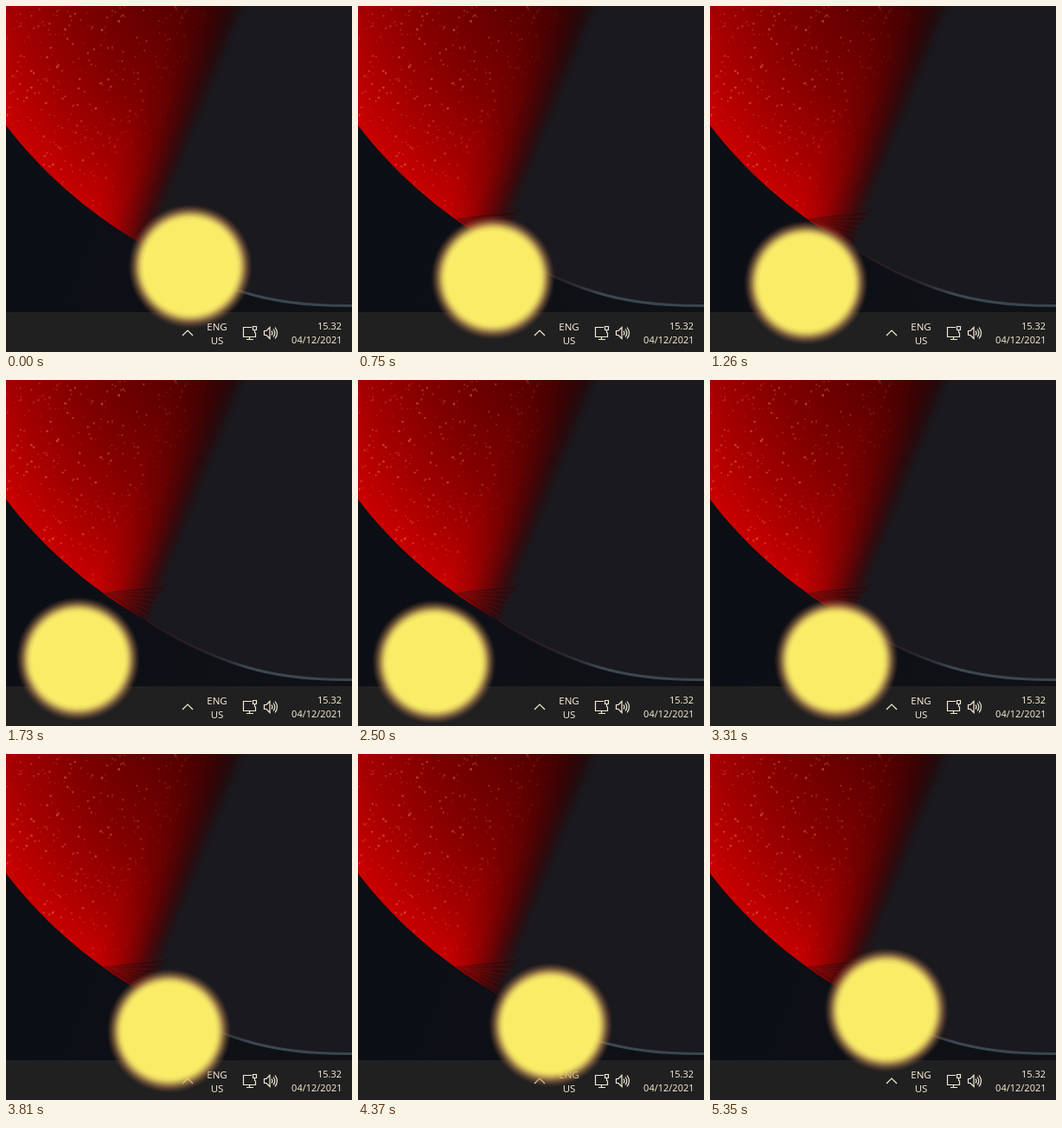
An HTML page with a canvas for the animation above (5.38 s loop, 400 by 400 pixels).

```html
<!DOCTYPE html>
<html lang="en">
<head>
<meta charset="utf-8">
<title>Glowing pointer</title>
<style>
html, body { margin: 0; width: 100%; height: 100%; overflow: hidden; background: #0b0d14; }
canvas { display: block; }
</style>
</head>
<body>
<canvas id="stage" width="400" height="400"></canvas>
<script>
const LOOP = 5380;
const ctx = document.getElementById('stage').getContext('2d');
const backdrop = document.createElement('canvas');
backdrop.width = backdrop.height = 400;

// Ball path: time, x, y
const keys = [
  [0, 213, 301], [550, 173, 311], [750, 156, 314], [1110, 123, 318],
  [1260, 111, 320], [1670, 86, 322], [1940, 78, 325], [2260, 78, 325],
  [2500, 88, 326], [2790, 104, 326], [3310, 146, 324], [3900, 197, 319],
  [4370, 223, 313], [4700, 229, 308], [5000, 222, 303], [5350, 204, 296]
];

const lowerRim = 'C195 300 235 319 275 331C310 342 350 347 400 346.5';

function addStops(gradient, stops) {
  for (const [at, color] of stops) gradient.addColorStop(at, color);
  return gradient;
}

function seeded(seed) {
  return () => (seed = seed * 16807 % 2147483647) / 2147483647;
}

function drawSphere(g) {
  g.save();
  g.clip(new Path2D('M0 138C38 188 92 237 152 272' + lowerRim + 'V0H0Z'));

  // Red glow, brightest at the rim
  g.fillStyle = addStops(g.createRadialGradient(390, -124, 200, 390, -124, 470), [
    [0, '#4e0000'], [0.15, '#5c0000'], [0.52, '#820000'], [0.77, '#a50000'], [1, '#cb0000']
  ]);
  g.fillRect(0, 0, 400, 400);

  const rand = seeded(77);
  g.fillStyle = '#e2714e';
  for (let i = 0; i < 620; i++) {
    const x = rand() * 250, y = rand() * 262;
    const edge = (250 - x - y * 0.4) / 110;
    g.globalAlpha = Math.max(0, Math.min(1, edge)) * (0.12 + rand() * 0.45);
    g.beginPath();
    g.arc(x, y, 0.6 + rand() * 0.9, 0, 7);
    g.fill();
  }
  g.globalAlpha = 1;

  // Dark face with a soft edge
  g.fillStyle = addStops(g.createLinearGradient(172, 69, 241, 97), [
    [0, 'rgba(20,6,10,0)'], [0.35, 'rgba(20,6,10,.16)'], [0.6, 'rgba(20,8,12,.44)'],
    [0.8, 'rgba(22,14,18,.76)'], [0.92, 'rgba(25,22,27,.95)'], [1, '#1a191e']
  ]);
  g.fillRect(0, 0, 400, 400);
  g.restore();

  g.lineWidth = 3;
  g.strokeStyle = addStops(g.createLinearGradient(165, 0, 400, 0),
    [[0, '#38383e00'], [0.3, '#38383e66'], [0.5, '#3b4851'], [1, '#39454e']]);
  g.stroke(new Path2D('M152 272' + lowerRim));
}

function drawTaskbar(g) {
  g.fillStyle = '#202021';
  g.fillRect(0, 354, 400, 46);

  g.fillStyle = '#fff3da';
  const label = (text, x, y, size, align) => {
    g.font = '500 ' + size + 'px "Open Sans", "Noto Sans", sans-serif';
    g.textAlign = align;
    g.fillText(text, x, y);
  };
  label('ENG', 244, 375, 11.5, 'center');
  label('US', 244, 391, 11.5, 'center');
  label('15.32', 388, 374, 11, 'right');
  label('04/12/2021', 388.5, 390, 11, 'right');

  g.strokeStyle = '#f5ecd6';
  g.lineWidth = 1.2;
  g.stroke(new Path2D('M204 381L210 375L216 381'));
  g.stroke(new Path2D('M284 371.5H274.5V382.5H288.5V377.5M278 385.5H286M281.5 382.5V385' +
    'M285.5 370.5H289.5V374.5H285.5ZM287.5 374.5V378'));
  g.stroke(new Path2D('M298.5 375.5H301L305 371.5V384.5L301 380.5H298.5Z' +
    'M307 375.5Q309 378 307 380.5M309 373.5Q312.5 378 309 382.5M311 371.5Q316 378 311 384.5'));
}

function drawBackdrop() {
  const g = backdrop.getContext('2d');
  g.fillStyle = addStops(g.createLinearGradient(0, 200, 330, 350),
    [[0, '#0b0e15'], [1, '#0f1116']]);
  g.fillRect(0, 0, 400, 400);
  drawSphere(g);
  drawTaskbar(g);
}

// Dim wedge left behind once the ball has passed the tip
function drawTrace() {
  ctx.fillStyle = 'rgba(42,9,12,.4)';
  ctx.fill(new Path2D('M113 246L188 235L170 256L163 279Z'));
  ctx.strokeStyle = 'rgba(150,30,28,.3)';
  ctx.lineWidth = 0.8;
  for (let i = 0; i < 7; i++) {
    ctx.beginPath();
    ctx.moveTo(116 + i * 2, 245 + i);
    ctx.lineTo(182 - i * 3, 237 + i * 6);
    ctx.stroke();
  }
}

function drawBall(x, y) {
  ctx.fillStyle = addStops(ctx.createRadialGradient(x, y, 0, x, y, 72), [
    [0, '#f9ec67'], [0.74, '#f9ec67'], [0.79, 'rgba(240,222,102,.96)'],
    [0.84, 'rgba(222,190,94,.82)'], [0.89, 'rgba(190,146,82,.6)'],
    [0.94, 'rgba(150,104,64,.36)'], [1, 'rgba(110,66,40,0)']
  ]);
  ctx.fillRect(x - 72, y - 72, 144, 144);
}

// Cubic through the keys, flat at turning points
function slope(i, axis) {
  const a = keys[i - 1], b = keys[i], c = keys[i + 1];
  if (!a || !c) {
    const [p, q] = a ? [a, b] : [b, c];
    return (q[axis] - p[axis]) / (q[0] - p[0]);
  }
  const turning = (b[axis] - a[axis]) * (c[axis] - b[axis]) <= 0;
  return turning ? 0 : (c[axis] - a[axis]) / (c[0] - a[0]);
}

function position(t, axis) {
  let i = keys.findIndex(k => k[0] > t) - 1;
  if (i < 0) i = keys.length - 2;
  const a = keys[i], b = keys[i + 1], span = b[0] - a[0];
  const u = Math.min(1, (t - a[0]) / span), v = 1 - u;
  return v * v * (1 + 2 * u) * a[axis] + u * u * (3 - 2 * u) * b[axis] +
    span * u * v * (v * slope(i, axis) - u * slope(i + 1, axis));
}

function draw(now) {
  const t = now % LOOP;
  const offset = t < 1290 ? 0 : t < 2200 ? 20 : 10;
  const step = Math.floor((t - offset) / 30) * 30 + offset;
  ctx.drawImage(backdrop, 0, 0);
  if (step > 400) drawTrace();
  drawBall(position(step, 1), position(step, 2));
}

drawBackdrop();
const start = performance.now();
function tick() {
  draw(performance.now() - start);
  requestAnimationFrame(tick);
}
tick();
</script>
</body>
</html>
```
